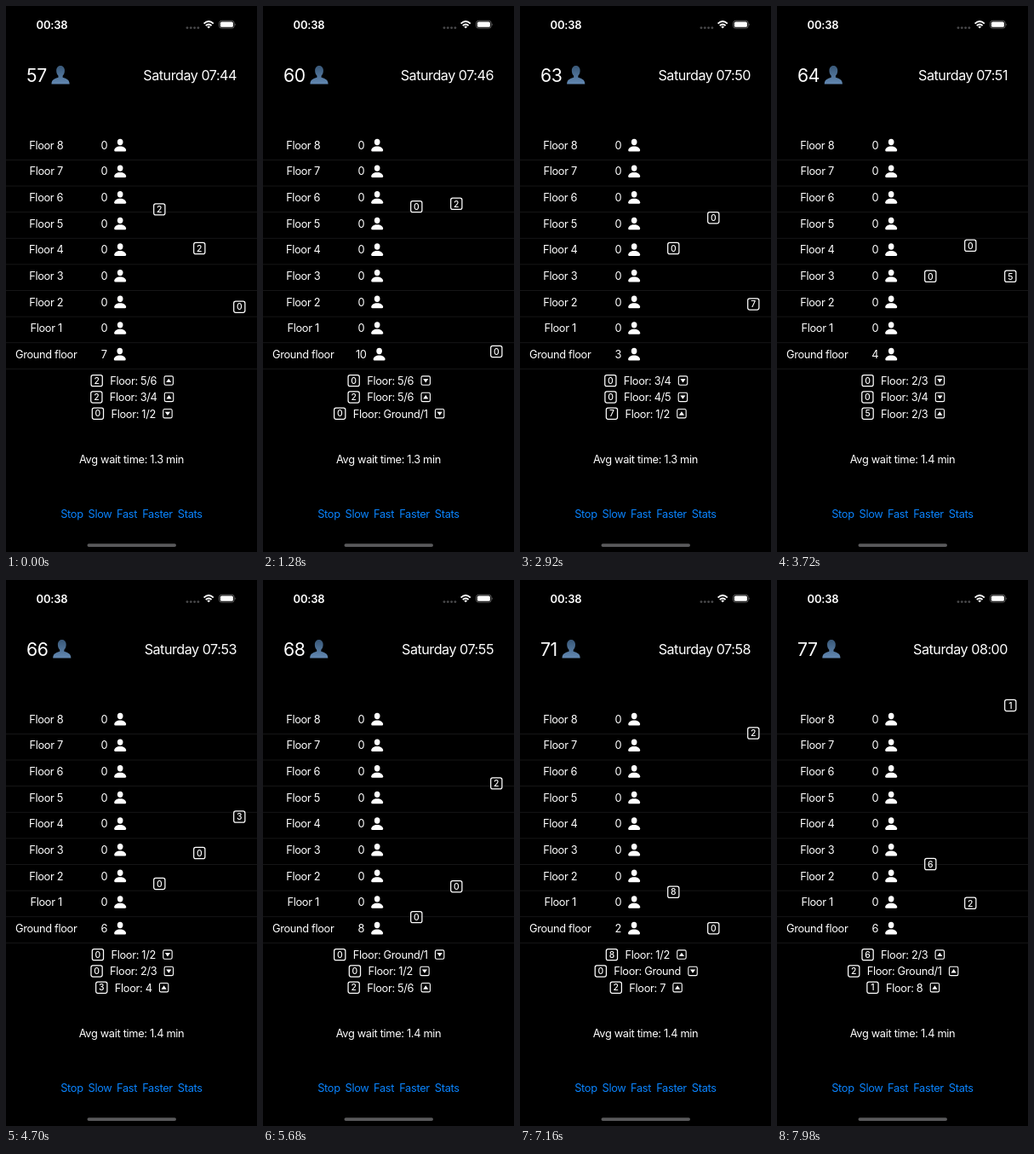
An HTML page that plays this animation: 295x640 px, repeating every 8000 ms.

```html
<!DOCTYPE html>
<html lang="en">
<head>
<meta charset="utf-8">
<title>Elevator simulation</title>
<style>
  html, body { margin: 0; width: 100%; height: 100%; overflow: hidden; background: #000; }
  svg { display: block; width: 100vw; height: 100vh; }
  text { font-family: Inter, "Open Sans", sans-serif; font-size: 12.8px; letter-spacing: -.32px; fill: #fff; white-space: pre; }
  .title { font-size: 16.2px; letter-spacing: -.5px; }
  .total { font-size: 21.2px; letter-spacing: -.4px; }
  .clock { font-size: 13px; font-weight: 600; letter-spacing: -.2px; }
  .small { font-size: 10.4px; font-weight: 500; letter-spacing: 0; }
  .link { fill: #0a84ff; }
</style>
</head>
<body>
<svg id="stage" viewBox="0 0 295 640">
  <defs>
    <linearGradient id="blue" x1="0" y1="0" x2="0" y2="1">
      <stop offset="0" stop-color="#395878"/>
      <stop offset="1" stop-color="#6389b3"/>
    </linearGradient>
  </defs>
  <rect width="295" height="640"/>
  <g fill="#4a4a4c">
    <circle cx="213" cy="25.6" r="1.4"/><circle cx="217.3" cy="25.6" r="1.4"/>
    <circle cx="221.6" cy="25.6" r="1.4"/><circle cx="225.9" cy="25.6" r="1.4"/>
  </g>
  <g fill="none" stroke="#fff" stroke-width="1.9">
    <path d="M232.6 20.6Q238.2 15.6 243.8 20.6M234.8 23Q238.2 20 241.6 23"/>
    <path d="M236.3 24.3Q238.2 22.7 240.1 24.3L238.2 26.3Z" fill="#fff" stroke="none"/>
  </g>
  <rect x="250.6" y="17.3" width="17.6" height="8.8" rx="2.8" fill="none" stroke="#777" stroke-width=".8"/>
  <rect x="251.9" y="18.6" width="15" height="6.2" rx="1.6" fill="#fff"/>
  <path d="M269.2 20.2q1.4 1.5 0 3z" fill="#777"/>
  <rect x="95.5" y="630.2" width="104.5" height="3.8" rx="1.9" fill="#59595b"/>
</svg>
<script>
const svg = document.getElementById('stage');
const LOOP = 8000, STEP = 163.3, LAST = 49;
const GROUND_Y = 408.2, UNIT = 3.266;

// Each car: column x, path as [tick, tenths of a floor], load as [tick, riders], direction as [tick, up].
const cars = [
  { x: 180.3,
    path: [[0, 52], [8, 60], [9, 60], [20, 49], [25, 49], [74, 0], [75, 0], [98, 23]],
    load: [[0, 2], [9, 0], [75, 9], [86, 8], [96, 6]],
    dir: [[0, 1], [9, 0], [75, 1]] },
  { x: 227.3,
    path: [[0, 38], [22, 60], [25, 60], [77, 8], [80, 8], [88, 0], [89, 0], [98, 9]],
    load: [[0, 2], [23, 0], [89, 2]],
    dir: [[0, 1], [24, 0], [89, 1]] },
  { x: 274.3,
    path: [[0, 17], [17, 0], [18, 0], [98, 80]],
    load: [[0, 0], [18, 10], [29, 7], [39, 5], [49, 3], [59, 2], [89, 1]],
    dir: [[0, 0], [18, 1]] }
];
const arrivals = [5, 11, 16, 25, 30, 34, 43, 48, 55, 61, 67, 73, 80, 84, 90, 92, 93, 95, 96, 97];
const boarded = [[0, 50], [18, 60], [75, 69], [89, 71]];

function el(tag, attrs, parent = svg) {
  const node = document.createElementNS('http://www.w3.org/2000/svg', tag);
  for (const key in attrs) node.setAttribute(key, attrs[key]);
  parent.appendChild(node);
  return node;
}
function label(x, y, str, cls = '', anchor = 'start', parent = svg) {
  const node = el('text', { x, y, class: cls, 'text-anchor': anchor }, parent);
  node.textContent = str;
  return node;
}
const move = (node, x, y) => node.setAttribute('transform', `translate(${x} ${y})`);

function person(parent) {
  const g = el('g', { fill: '#fff' }, parent);
  el('ellipse', { cx: 0, cy: -3.7, rx: 3.3, ry: 3.7 }, g);
  el('path', { d: 'M-5.5 7.3Q-7 7.3-7 5.8C-6.6 3.2-4 1.3 0 1.3S6.6 3.2 7 5.8Q7 7.3 5.5 7.3Z' }, g);
  return g;
}
function badge() {
  const g = el('g', {});
  el('rect', { x: -6.6, y: -6.6, width: 13.2, height: 13.2, rx: 2.2, fill: 'none', stroke: '#fff', 'stroke-width': 1.25 }, g);
  return { g, num: label(0, 3.75, '', 'small', 'middle', g) };
}
function waitRow(y) {
  const num = label(0, y + 4.6, ''), icon = person(svg);
  return n => {
    num.textContent = n;
    const w = num.getComputedTextLength(), x = 126.3 - (w + 22) / 2;
    num.setAttribute('x', x);
    move(icon, x + w + 15, y);
  };
}
function statusRow(y) {
  const box = badge(), text = label(0, y + 4.6, ''), arrow = el('g', {});
  el('rect', { x: -5.2, y: -5.2, width: 10.4, height: 10.4, rx: 1.7, fill: 'none', stroke: '#fff', 'stroke-width': 1.1 }, arrow);
  const tip = el('path', { d: 'M0-2.4L3.1 2H-3.1Z', fill: '#fff' }, arrow);
  return (riders, floor, up) => {
    box.num.textContent = riders;
    text.textContent = 'Floor: ' + floor;
    const w = text.getComputedTextLength(), x = 148.2 - (w + 43) / 2;
    move(box.g, x + 7.5, y - .2);
    text.setAttribute('x', x + 23);
    move(arrow, x + w + 37, y - .2);
    tip.setAttribute('transform', up ? '' : 'scale(1 -1)');
  };
}

const held = (keys, t) => keys.filter(k => k[0] <= t).pop()[1];
function along(keys, t) {
  const i = Math.max(1, keys.findIndex(k => k[0] >= t));
  const [t0, a] = keys[i - 1], [t1, b] = keys[i];
  return a + (b - a) * (t - t0) / (t1 - t0);
}
function floorName(n) {
  const low = Math.floor(n / 10), name = low || 'Ground';
  return n % 10 ? `${name}/${low + 1}` : name;
}

label(54, 26.6, '00:38', 'clock', 'middle');
const total = label(24, 88.6, '', 'total');
const date = label(271, 86.8, '', 'title', 'end');
const bust = el('g', { fill: 'url(#blue)' });
el('path', { d: 'M-4.9-5.5C-4.9-13 4.9-13 4.9-5.5C4.9-2.4 3.8-.6 2.6.6V2.6C7 4 10.6 5 10.6 10.4H-10.6C-10.6 5-7 4-2.6 2.6V.6C-3.8-.6-4.9-2.4-4.9-5.5Z' }, bust);

let setGround;
for (let i = 0; i < 9; i++) {
  const y = 163.2 + 30.62 * i;
  label(47.2, y + 4.6, i < 8 ? 'Floor ' + (8 - i) : 'Ground floor', '', 'middle');
  setGround = waitRow(y);
  setGround(0);
  el('rect', { x: 0, y: y + 16.8, width: 295, height: .8, fill: '#1b1b1c' });
}
for (const [i, car] of cars.entries()) {
  car.box = badge();
  car.status = statusRow(439.3 + 19.3 * i);
}
const average = label(147.5, 535.6, '', '', 'middle');
[['Stop', 77.5], ['Slow', 110.5], ['Fast', 142], ['Faster', 178], ['Stats', 216.3]]
  .forEach(([str, x]) => label(x, 599.6, str, 'link', 'middle'));

function draw(time) {
  const t = time % LOOP;
  const step = t < 150 ? 0 : Math.min(LAST, Math.floor((t + 36) / STEP));
  const tick = step * 2;
  const count = 57 + arrivals.filter(a => a <= tick).length;
  const minute = 44 + Math.floor(tick / 6);

  total.textContent = count;
  move(bust, 24 + total.getComputedTextLength() + 16.3, 81.2);
  date.textContent = 'Saturday ' + (minute < 60 ? '07:' + minute : '08:00');
  setGround(count - held(boarded, tick));
  average.textContent = `Avg wait time: ${tick < 42 ? 1.3 : 1.4} min`;

  for (const car of cars) {
    const n = Math.round(along(car.path, tick)), riders = held(car.load, tick);
    car.box.num.textContent = riders;
    move(car.box.g, car.x, GROUND_Y - UNIT * n);
    car.status(riders, floorName(n), held(car.dir, tick));
  }
}

const start = performance.now();
function loop() {
  draw(performance.now() - start);
  requestAnimationFrame(loop);
}
loop();
</script>
</body>
</html>
```
